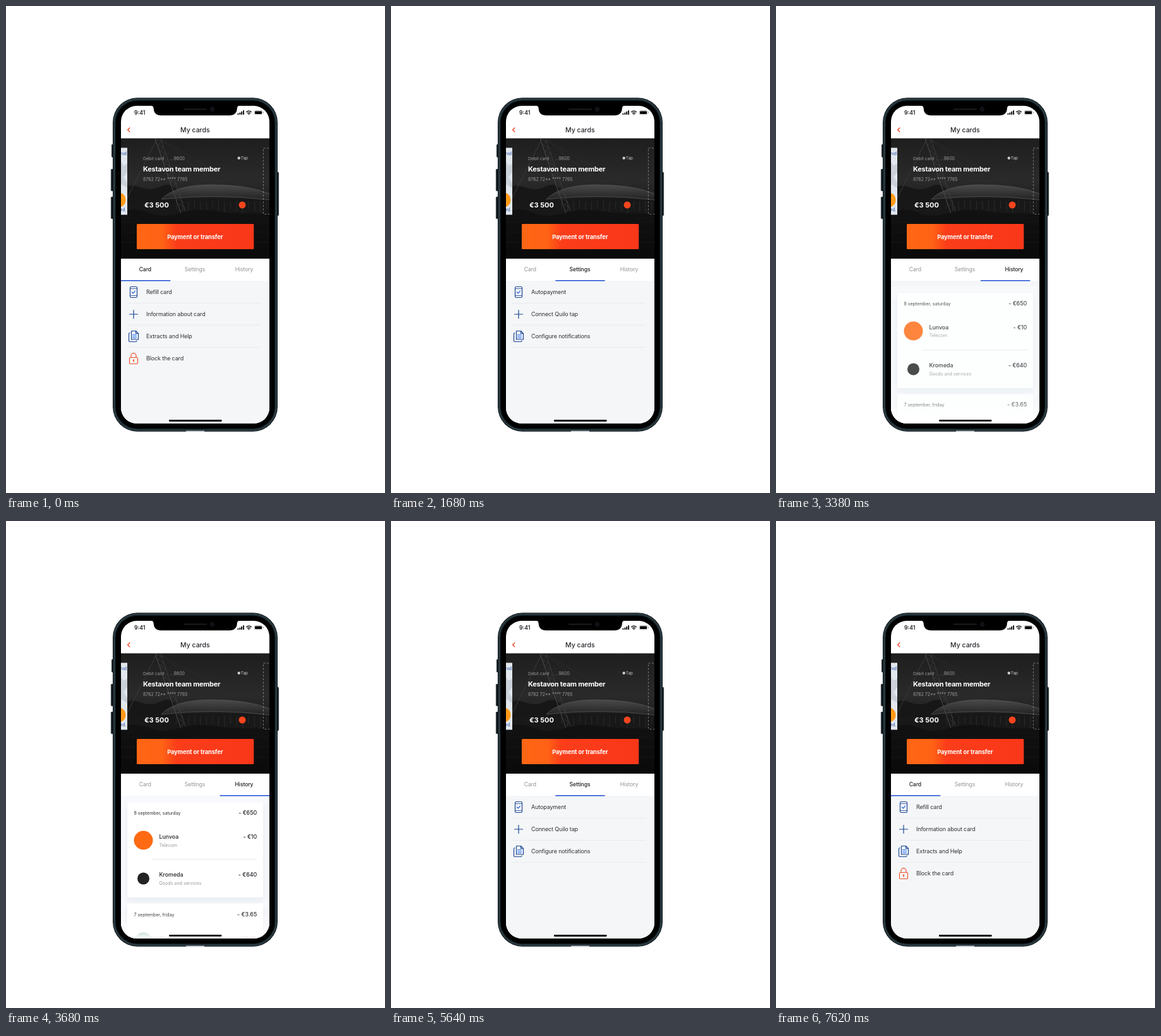
Write an HTML page that moves like this. It is 600 px wide and 771 px high and loops after 8700 ms.

```html
<!DOCTYPE html>
<html lang="en">
<head>
<meta charset="utf-8">
<title>My cards</title>
<style>
  html, body { margin: 0; width: 100%; height: 100%; overflow: hidden; background: #fff; }
  svg { display: block; width: 100%; height: 100%; }
  text { font-family: Inter, Roboto, "Open Sans", sans-serif; fill: #222428; }
  .item { font-size: 9px; letter-spacing: -.15px; fill: #303237; }
  .tab { font-size: 8.6px; letter-spacing: -.1px; text-anchor: middle; fill: #919191; }
  .tab.on { font-weight: 500; fill: #1d1d1f; }
  .name { font-size: 8.9px; font-weight: 500; letter-spacing: -.05px; }
  .date { font-size: 7.1px; letter-spacing: -.05px; fill: #303237; }
  .kind { font-size: 7.2px; letter-spacing: -.05px; fill: #96989c; }
  .sum { font-size: 8.9px; font-weight: 500; text-anchor: end; }
  .pale { font-size: 7px; fill: #9b9b9b; }
  .bold { font-weight: 700; fill: #fff; }
  .icon { fill: none; stroke: #1d4591; stroke-width: 1.2; stroke-linecap: round; stroke-linejoin: round; }
  .rule { stroke: #e8eaed; stroke-width: 1; }
</style>
</head>
<body>
<svg viewBox="0 0 600 771" preserveAspectRatio="none">
  <defs>
    <clipPath id="screen"><rect x="182" y="158" width="235" height="503" rx="25"/></clipPath>
    <clipPath id="content"><rect x="182" y="435.5" width="235" height="226"/></clipPath>
    <linearGradient id="night" x2="0" y2="1">
      <stop offset="0" stop-color="#1e1e1e"/><stop offset=".35" stop-color="#2a2a2a"/>
      <stop offset=".5" stop-color="#202020"/><stop offset=".68" stop-color="#101010"/><stop offset="1" stop-color="#0a0a0a"/>
    </linearGradient>
    <linearGradient id="roof" x2="0" y2="1">
      <stop offset="0" stop-color="#4a4a4a"/><stop offset="1" stop-color="#222"/>
    </linearGradient>
    <linearGradient id="fire">
      <stop offset="0" stop-color="#ff6614"/><stop offset=".22" stop-color="#ff6215"/>
      <stop offset=".34" stop-color="#fb3d1a"/><stop offset="1" stop-color="#f93719"/>
    </linearGradient>
    <linearGradient id="mist" x2="0" y2="1">
      <stop offset="0" stop-color="#fff" stop-opacity="0"/><stop offset=".88" stop-color="#fff" stop-opacity=".9"/>
      <stop offset="1" stop-color="#fff"/>
    </linearGradient>
    <filter id="shade" x="-10%" y="-10%" width="120%" height="125%">
      <feDropShadow dx="0" dy="5" stdDeviation="4" flood-color="#28345a" flood-opacity=".07"/>
    </filter>
    <g id="phone" class="icon"><rect x="196.5" y="444.5" width="11" height="17" rx="1.8"/><path d="M196.5 447.5h11M196.5 458.5h11" stroke-width=".8"/><path d="M199.5 453l1.8 1.8 3.2-3.6" stroke="#1f5be0"/></g>
    <path id="plus" class="icon" d="M195.5 488h13M202 481.5v13"/>
    <g id="pages" class="icon"><path d="M198.5 514.5h7l4 4v9.5h-11z"/><path d="M205.5 514.5v4h4"/><path d="M196 517.5q-1.5 0-1.5 1.5v11q0 1.5 1.5 1.5h9.5q1.5 0 1.5-1.5"/><path d="M200.5 520.5h6M200.5 523h6M200.5 525.5h6" stroke="#1f6bf0" stroke-width="1"/></g>
    <g id="lock" class="icon" style="stroke:#f4502f"><rect x="195.5" y="556.5" width="13" height="10" rx="1.5"/><path d="M198 556.5v-2.800a4 4 0 0 1 8 0v2.8"/><path d="M202 561.5v1.8"/><circle cx="202" cy="560.7" r=".7"/></g>
  </defs>

  <!-- phone body -->
  <g fill="#10181c" stroke="#28363c" stroke-width=".6">
    <rect x="167.3" y="219.3" width="4" height="20" rx="1"/>
    <rect x="166.3" y="258.3" width="5" height="34.5" rx="1"/>
    <rect x="166.3" y="302.3" width="5" height="34.5" rx="1"/>
    <rect x="428" y="263.3" width="3.7" height="68.5" rx="1"/>
  </g>
  <rect x="169" y="145.3" width="261" height="528.4" rx="39" fill="#0a0e10"/>
  <rect x="171.7" y="148" width="255.600" height="523" rx="36.500" fill="#000" stroke="#202f36" stroke-width="3.400"/>
  <rect x="170.800" y="147" width="257.400" height="525" rx="37.500" fill="none" stroke="#40525a" stroke-width=".8"/>
  <rect x="285" y="672.5" width="29" height="1.5" fill="#c4c8ca"/>

  <g clip-path="url(#screen)">
    <rect x="182" y="158" width="235" height="504" fill="#fff"/>
    <text x="203" y="172" font-size="8.7" font-weight="600">9:41</text>
    <path d="M366.5 170h1.800v2h-1.800zM369.5 168.800h1.800v3.200h-1.800zM372.3 167h1.800v5h-1.800zM375.2 165.300h1.800v6.700h-1.800z"/>
    <path d="M380.3 168q4.200-3.800 8.400 0M382 170q2.500-2.200 5 0" fill="none" stroke="#000" stroke-width="1.3"/>
    <circle cx="384.5" cy="171.3" r="1"/>
    <rect x="393" y="165.5" width="13" height="6.5" rx="2" fill="#fff" stroke="#999" stroke-width=".6"/>
    <rect x="394" y="166.5" width="11" height="4.5" rx="1"/>
    <path d="M407.5 167.7v2" stroke="#888" stroke-width=".8"/>
    <path d="M196.2 192.5l-3.5 3.5 3.5 3.5" fill="none" stroke="#f0492a" stroke-width="1.4"/>
    <text x="276" y="199.7" font-size="10.5" font-weight="500">My cards</text>

    <!-- card banner -->
    <rect x="182" y="209.5" width="235" height="190.5" fill="url(#night)"/>
    <g id="arena"></g>
    <rect x="182" y="224.5" width="10" height="106" fill="#e2e7ed"/>
    <path d="M182 247l5 6 5-4v14l-6 8 6 9v8l-10-6z" fill="#cbd1d9"/>
    <path d="M182 296q7.5 3 7.500 11t-7.500 11z" fill="#ff9a16"/>
    <text x="181" y="235.5" font-size="7" style="fill:#2a51a4">nid</text>
    <text x="181.5" y="325" font-size="7" style="fill:#2a51a4">rd.</text>
    <rect x="407.4" y="225" width="30" height="104.5" fill="none" stroke="#959595" stroke-width=".8" stroke-dasharray="3 2.5"/>
    <text class="pale" x="217" y="243.5" style="font-size:6.8px">Debit card</text>
    <text class="pale" x="259.5" y="243.5">...9800</text>
    <circle cx="368.7" cy="240.7" r="2.2" fill="#ccc"/>
    <text x="371.8" y="243.1" font-size="6.4" style="fill:#ccc">Tap</text>
    <text class="bold" x="217" y="262" font-size="11" letter-spacing="-.25">Kestavon team member</text>
    <text class="pale" x="217" y="277">8762 72** **** 7765</text>
    <text class="bold" x="219" y="319" font-size="11">€3 500</text>
    <circle cx="374" cy="315" r="5.5" fill="#f6451d"/>
    <rect x="207" y="345" width="185.3" height="40" rx="1.5" fill="url(#fire)"/>
    <text class="bold" x="299.3" y="368.8" font-size="9.3" text-anchor="middle" letter-spacing="-.1">Payment or transfer</text>

    <rect x="182" y="435" width="235" height="227" fill="#f4f6f8"/>
    <g clip-path="url(#content)">
      <g id="cardList"></g>
      <g id="settingsList"></g>
      <rect x="258" y="655" width="83.5" height="2.8" rx="1.4"/>
      <g id="history"></g>
    </g>
    <text class="tab" x="220.3" y="420">Card</text>
    <text class="tab" x="299" y="420">Settings</text>
    <text class="tab" x="377" y="420">History</text>
    <rect id="marker" y="434" width="78.3" height="1.5" fill="#1d50d2"/>

    <rect id="fade" x="182" y="620" width="235" height="41" fill="url(#mist)"/>
    <rect id="homeBar" x="258" y="655" width="83.5" height="2.8" rx="1.4"/>
  </g>

  <!-- notch -->
  <path d="M228.5 157.500c4 .3 5 2 5.200 5 .4 7 4.800 10.800 11.800 10.800h108.500c7 0 11.400-3.800 11.800-10.800 .2-3 1.200-4.700 5.200-5z"/>
  <path d="M282 163.5h35" stroke="#1d1d1f" stroke-width="2" stroke-linecap="round"/>
  <circle cx="326.5" cy="163.5" r="3" fill="#0b0d14" stroke="#24262c" stroke-width=".8"/>
</svg>

<script>
const $ = id => document.getElementById(id);
const LOOP = 8700, STEP = 20, PAGE = 234.5, TAB = 78.3, LIFT = 48;

// Each move is first seen at `at`, with the easing already `lead` ms under way.
const moves = [
  { at: 1260, lead: 20, end: 1680, from: 0, to: 1 },
  { at: 3100, lead: 33, end: 3680, from: 1, to: 2 },
  { at: 5220, lead: 21, end: 5640, from: 2, to: 1 },
  { at: 7200, lead: 20, end: 7620, from: 1, to: 0 }
];

const text = (cls, x, y, s) => `<text class="${cls}" x="${x}" y="${y}">${s}</text>`;
const rule = (x1, x2, y) => `<path class="rule" d="M${x1} ${y}H${x2}"/>`;

function list(labels) {
  const icons = ["phone", "plus", "pages", "lock"];
  return labels.map((label, i) =>
    `<use href="#${icons[i]}"/>` + text("item", 222, 456 + i * 35, label) +
    (i < 3 ? rule(192, 403, 470.5 + i * 35) : "")).join("");
}

const panel = (y, h) => `<rect x="192" y="${y}" width="215" height="${h}" rx="1" fill="#fff" filter="url(#shade)"/>`;
const heading = (y, day, sum) => text("date", 202.5, y + 2.5, day) + text("sum", 397.3, y + 2.5, sum);
const entry = (y, name, kind, sum, color, r) =>
  `<circle cx="217.5" cy="${y + 6}" r="${r}" fill="${color}"/>` +
  text("name", 242.5, y + 3.2, name) + text("kind", 242.5, y + 16, kind) + text("sum", 397.3, y + 3.2, sum);

function arena() {
  let lines = "", posts = "";
  const line = (x1, y1, x2, y2, c, w = 0.6) =>
    lines += `<path d="M${x1} ${y1}L${x2} ${y2}" stroke="${c}" stroke-width="${w}"/>`;
  for (let i = 0; i < 12; i++) {
    const x = 237 + i * 3.4, y = 210 + i * 9.5;
    line(x, y, x + 9, y + 5, "#424242");
    line(x + 9, y + 5, x + 3.4, y + 9.5, "#424242");
  }
  line(236, 210, 279, 334, "#4c4c4c", 1);
  line(245, 210, 287, 334, "#404040", 0.8);
  line(238, 212, 192, 304, "#3a3a3a", 1);
  line(246, 212, 335, 284, "#353535", 0.5);
  line(246, 212, 375, 286, "#353535", 0.5);
  for (let i = 0; i < 16; i++) posts += `M${270 + i * 9.5} 309v${12 + i % 3 * 4}`;
  return `<path d="M182 292q14-12 30-5t32-1 30 6v30H182z" fill="#171717"/>
     <path d="M246 306Q268 283 325 283T417 297V307Q330 296 246 306z" fill="url(#roof)"/>
     <path d="M182 313Q300 299 417 307V334H182z" fill="#181818"/>
     <path d="M246 306Q268 283 325 283T417 297M246 306Q330 296 417 307" fill="none" stroke="#565656" stroke-width=".8"/>
     <path d="${posts}" stroke="#303030" stroke-width=".8"/>` + lines +
    `<path d="M182 327q20-9 42 0t50 1 60-3 83 3v10H182z" fill="#111"/>
     <path d="M182 342H417M182 358H417M182 374H417" stroke="#161616"/>`;
}

$("arena").innerHTML = arena();
$("cardList").innerHTML = list(["Refill card", "Information about card", "Extracts and Help", "Block the card"]);
$("settingsList").innerHTML = list(["Autopayment", "Connect Quilo tap", "Configure notifications"]);
$("history").innerHTML =
  `<rect x="182" y="435" width="235" height="280" fill="#f8f9fc"/>` +
  panel(445.5, 150.5) + heading(462.7, "8 september, saturday", "- €650") +
  entry(499.5, "Lunvoa", "Telecom", "- €10", "#ff6a13", 15) + rule(231, 397, 535.5) +
  entry(560, "Kromeda", "Goods and services", "- €640", "#232323", 9.5) +
  panel(605.5, 110) + heading(623, "7 september, friday", "- €3.65") +
  entry(660.5, "Tanelbrew", "Food and drinks", "- €3.65", "#0b7048", 15);

// cubic-bezier(.25, .1, .25, 1)
function ease(x) {
  if (x <= 0 || x >= 1) return x <= 0 ? 0 : 1;
  let lo = 0, hi = 1;
  for (let i = 0; i < 24; i++) {
    const u = (lo + hi) / 2;
    if (0.75 * u * (1 - u) + u ** 3 < x) lo = u; else hi = u;
  }
  return 0.3 * lo * (1 - lo) ** 2 + 3 * lo * lo * (1 - lo) + lo ** 3;
}

const tabs = document.querySelectorAll(".tab");
const shift = (id, x, y = 0) => $(id).setAttribute("transform", `translate(${x} ${y})`);
const show = (id, on) => $(id).setAttribute("visibility", on ? "visible" : "hidden");

function draw(ms) {
  const t = Math.floor(ms % LOOP / STEP) * STEP;
  const move = moves.filter(m => t >= m.at).pop();
  let page = 0, target = 0;
  if (move) {
    const start = move.at - move.lead;
    page = move.from + (move.to - move.from) * ease((t - start) / (move.end - start));
    target = move.to;
  }
  const leavingHistory = move && move.from === 2 && t < move.end;
  const reveal = Math.max(0, page - 1);

  tabs.forEach((tab, i) => tab.classList.toggle("on", i === target));
  $("marker").setAttribute("x", 182 + page * TAB);
  shift("cardList", -page * PAGE);
  shift("settingsList", (1 - page) * PAGE);
  shift("history", 0, (1 - reveal) * LIFT);
  $("history").setAttribute("opacity", reveal);
  show("fade", target === 2);
  show("homeBar", !leavingHistory);
}

const origin = performance.now();
function tick() {
  draw(performance.now() - origin);
  requestAnimationFrame(tick);
}
tick();
</script>
</body>
</html>
```
